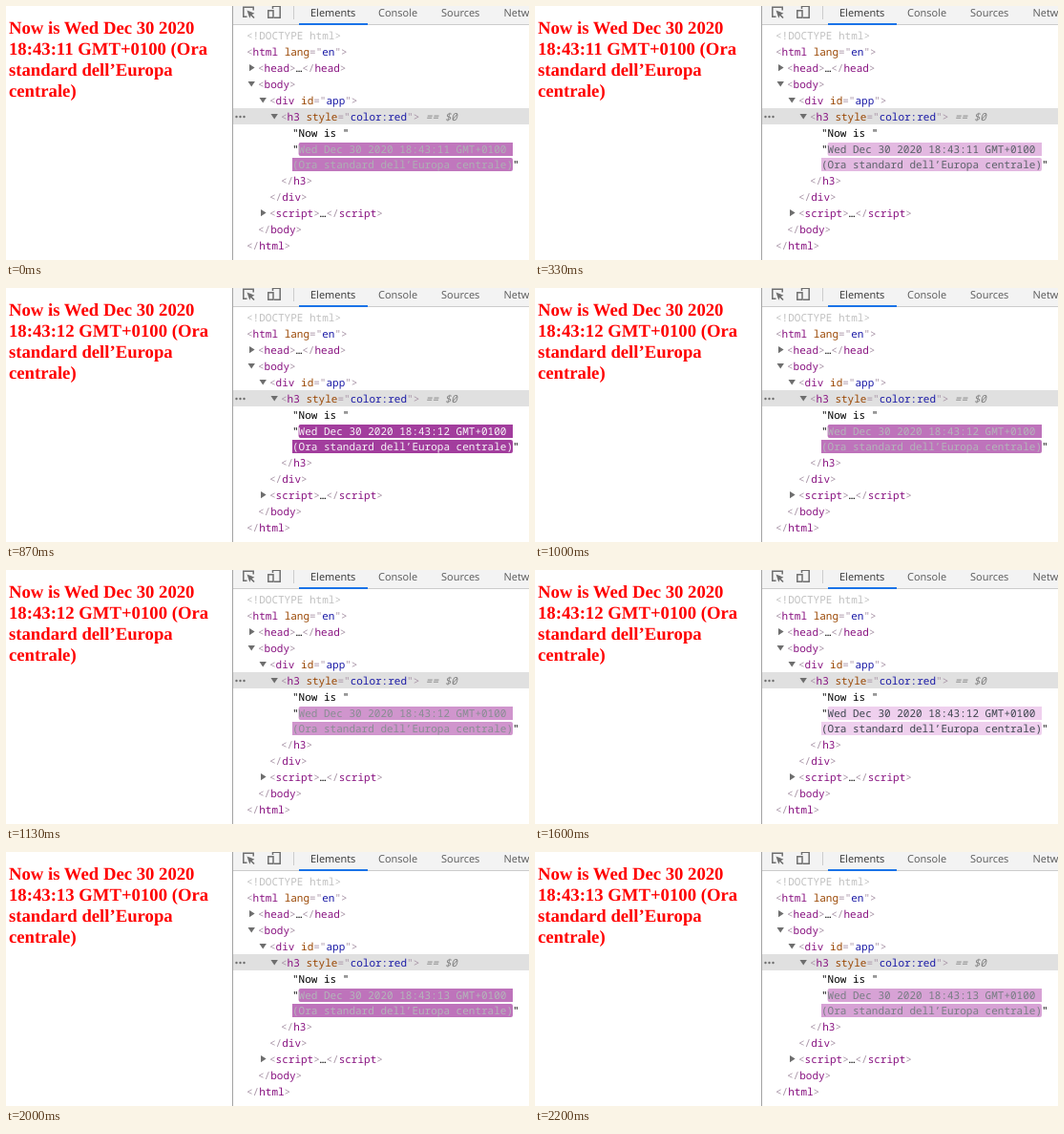
Recreate the animation shown at these times as an HTML page. Size 548 by 266 pixels, loop 2270 ms.

```html
<!DOCTYPE html>
<html lang="en">
<head>
<meta charset="utf-8">
<title>Clock in the element tree</title>
<style>
  html, body { margin: 0; width: 100%; height: 100%; overflow: hidden; background: #fff; }
  svg { display: block; }
  text { white-space: pre; text-rendering: geometricPrecision; }
  .page { font: bold 18.72px "Liberation Serif", "Times New Roman", serif; fill: #f00; }
  .tab { font: 11px "Open Sans", "Noto Sans", sans-serif; fill: #5a5a5a; }
  .tab.on { fill: #333; }
  .code { font: 11px "Noto Sans Mono", "DejaVu Sans Mono", monospace; fill: #000; }
  .code .mark { fill: #a894a6; }
  .code .name { fill: #881280; }
  .code .attr { fill: #994500; }
  .code .value { fill: #1a1aa6; }
  .code .doctype { fill: #c0c0c0; }
  .code .ref { fill: #808080; font-style: italic; }
  .icon { fill: none; stroke: #6e6e6e; stroke-width: 1.5; }
  .solid { fill: #6e6e6e; }
</style>
</head>
<body>
<svg id="stage" width="548" height="266" viewBox="0 0 548 266">
  <rect width="548" height="266" fill="#fff"/>
  <g id="page"></g>
  <rect x="237" width="1" height="266" fill="#a3a3a3"/>
  <rect x="238" width="310" height="19" fill="#f3f3f3"/>
  <rect x="238" y="19" width="310" height="1" fill="#ccc"/>
  <rect x="307" y="18" width="72" height="2" fill="#1a73e8"/>
  <rect x="301" width="1" height="14" fill="#ccc"/>
  <path class="icon" d="M252.5 11.2H248.8V1.2H259.2V4.5"/>
  <path class="solid" d="M252.5 4.5L260.5 7.8L257.6 8.9L260.6 11.9L259.4 13L256.5 10.1L255.3 12.8Z"/>
  <path class="icon" d="M279.5 3V0.2H287.2V12.2H281"/>
  <rect class="icon" x="274.8" y="4.8" width="5.2" height="7.4"/>
  <g id="tabs"></g>
  <rect x="238" y="107" width="310" height="17" fill="#e0e0e0"/>
  <g class="solid">
    <circle cx="241.5" cy="116" r="1.2"/><circle cx="245.5" cy="116" r="1.2"/><circle cx="249.5" cy="116" r="1.2"/>
  </g>
  <g id="flash">
    <path d="M531 143H308.6a2 2 0 0 0 -2 2V155a2 2 0 0 0 2 2H531Z"/>
    <path d="M300 159H529a2 2 0 0 1 2 2V171a2 2 0 0 1 -2 2H300Z"/>
  </g>
  <g id="tree"></g>
</svg>
<script>
const LOOP = 2270, FPS = 15;
const TICKS = [-160, 855, 1855];   // moments when the clock advances
const FADE = 1120;
const CHAR = 6.6, INDENT = 12, TREE_X = 252;
const BACK = [[158, 54, 153], [245, 219, 244]];
const INK = [[255, 255, 255], [48, 57, 66]];

const byId = id => document.getElementById(id);

function add(parent, tag, attrs, content = "") {
  const el = document.createElementNS("http://www.w3.org/2000/svg", tag);
  for (const key in attrs) el.setAttribute(key, attrs[key]);
  el.textContent = content;
  parent.appendChild(el);
  return el;
}

// Page heading
const heading = ["Now is Wed Dec 30 2020", "", "standard dell’Europa", "centrale)"].map((line, i) =>
  add(byId("page"), "text", { class: "page", x: 3, y: 29 + 22 * i }, line));

// Panel tabs
[["Elements", 319], ["Console", 390], ["Sources", 456], ["Network", 521.5]].forEach(([label, x], i) =>
  add(byId("tabs"), "text", { class: i ? "tab" : "tab on", x, y: 11 }, label));

// Element tree: each row is a list of [text, class] spans
const tree = byId("tree");
const open = (name, attr, value) => [
  ["<", "mark"], [name, "name"],
  ...(attr ? [[" ", "mark"], [attr, "attr"], ['="', "mark"], [value, "value"], ['"', "mark"]] : []),
  [">", "mark"]
];
const close = name => [["</", "mark"], [name, "name"], [">", "mark"]];
const folded = name => [...open(name), ["…", ""], ...close(name)];

function row(level, mid, spans, arrow) {
  const x = TREE_X + INDENT * level;
  const text = add(tree, "text", { class: "code", x, y: mid + 4 });
  spans.forEach(([content, cls]) => add(text, "tspan", { class: cls }, content));
  if (arrow) {
    const d = arrow === "down"
      ? `M${x - 10.5} ${mid - 3}h7.4l-3.7 5.6z`
      : `M${x - 9} ${mid - 4}v7.2l5.6 -3.6z`;
    add(tree, "path", { class: "solid", d });
  }
}

row(0, 31, [["<!DOCTYPE html>", "doctype"]]);
row(0, 48, open("html", "lang", "en"));
row(1, 65, folded("head"), "right");
row(1, 82, open("body"), "down");
row(2, 99, open("div", "id", "app"), "down");
row(3, 116, [...open("h3", "style", "color:red"), [" == $0", "ref"]], "down");
row(4, 133, [['"Now is "', ""]]);
row(4, 150, [['"', ""]]);
row(3, 183, close("h3"));
row(2, 200, close("div"));
row(2, 217, folded("script"), "right");
row(1, 234, close("body"));
row(0, 251, close("html"));

const stamp = add(tree, "text", { class: "code", x: 300 + CHAR, y: 154 });
const zone = add(tree, "text", { class: "code", x: 300, y: 170 }, "(Ora standard dell’Europa centrale)");
add(tree, "text", { class: "code", x: 300 + 35 * CHAR, y: 170 }, '"');

// cubic-bezier(0, 0, 0.2, 1)
function ease(x) {
  if (x >= 1) return 1;
  let lo = 0, hi = 1;
  for (let i = 0; i < 24; i++) {
    const s = (lo + hi) / 2;
    if (0.6 * s * s * (1 - s) + s * s * s < x) lo = s; else hi = s;
  }
  return lo * lo * (3 - 2 * lo);
}

const mix = ([from, to], p) => `rgb(${from.map((c, i) => Math.round(c + (to[i] - c) * p)).join(",")})`;

function draw(ms) {
  const step = Math.floor((Math.floor(ms / 10) * 10 + 4) * FPS / 1000);
  const now = step * 1000 / FPS;
  const tick = TICKS.filter(t => t <= now).length - 1;
  const p = ease((now - TICKS[tick]) / FADE);
  const time = `18:43:${11 + tick} GMT+0100`;

  heading[1].textContent = `${time} (Ora`;
  stamp.textContent = `Wed Dec 30 2020 ${time}`;
  byId("flash").setAttribute("fill", mix(BACK, p));
  stamp.style.fill = zone.style.fill = mix(INK, p);
}

const start = performance.now();
function loop() {
  draw((performance.now() - start) % LOOP);
  requestAnimationFrame(loop);
}
loop();
</script>
</body>
</html>
```
